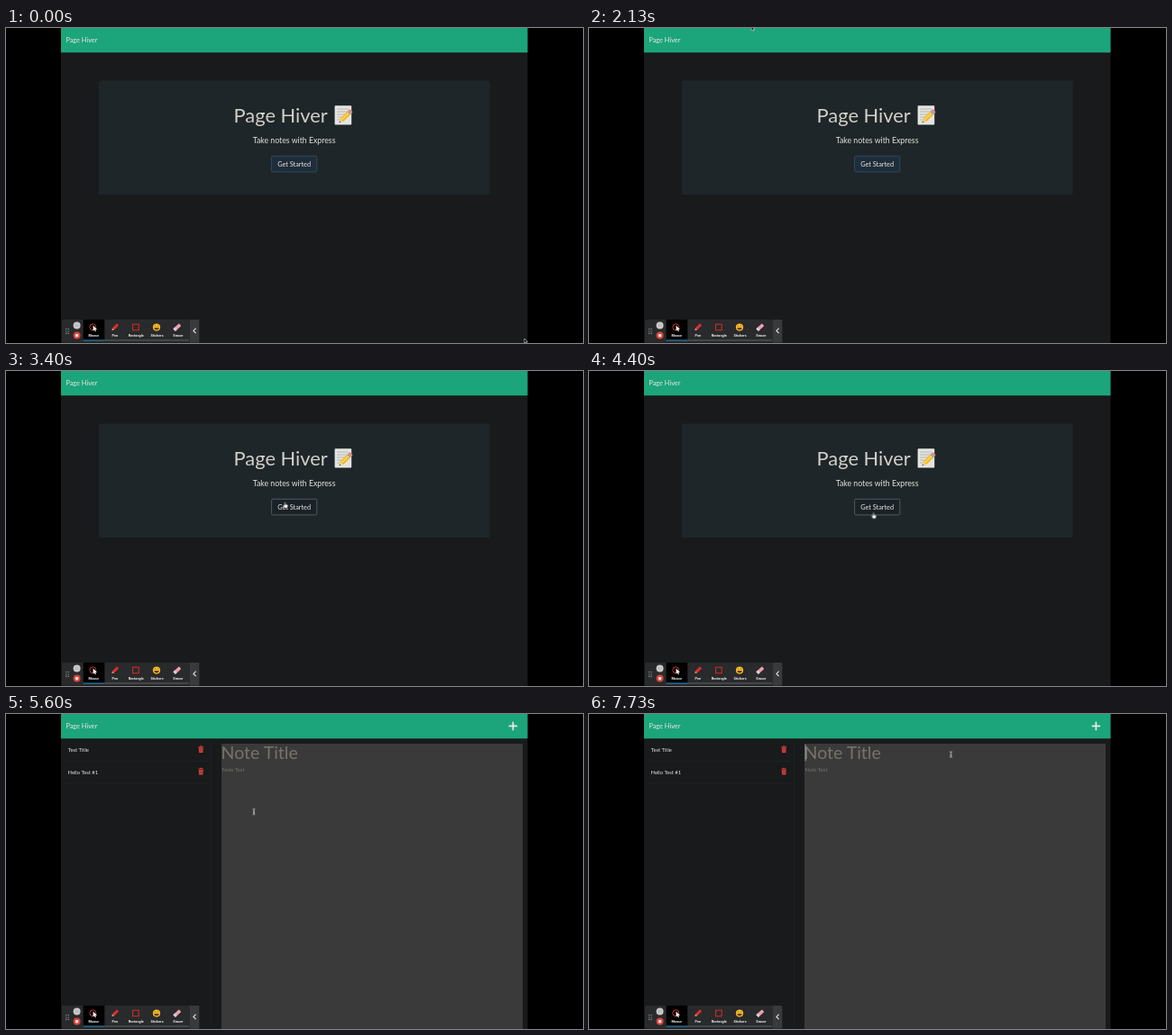
Write an HTML page that moves like this. It is 640 by 350 pixels and loops after 8 s.

```html
<!DOCTYPE html>
<html lang="en">
<head>
<meta charset="utf-8">
<title>Page Hiver</title>
<style>
html, body { margin: 0; width: 100%; height: 100%; overflow: hidden; background: #000; }
svg { display: block; width: 640px; height: 350px; font-family: Lato, sans-serif; }
.loop { animation: 8s step-end infinite; }
.home { animation-name: home; }
.notes { animation-name: notes; }
.loaded { animation-name: loaded; }
.labels { animation-name: labels; }
.paused { animation-name: paused; }
.hover { animation-name: hover; }
.caret { animation-name: caret; }
.arrow { animation-name: arrow; }
.hand { animation-name: hand; }
.beam { animation-name: loaded; }
.pointer { animation: move 8s linear infinite; }

@keyframes home { 0% { visibility: visible } 59.125%, 100% { visibility: hidden } }
@keyframes notes { 0% { visibility: hidden } 59.125%, 100% { visibility: visible } }
@keyframes loaded { 0% { visibility: hidden } 61.625%, 100% { visibility: visible } }
@keyframes labels { 0% { opacity: 1 } 59.125% { opacity: 0 } 61.625%, 100% { opacity: 1 } }
@keyframes paused { 0% { opacity: 0 } 59.125% { opacity: 1 } 61.625%, 100% { opacity: 0 } }
@keyframes hover { 0% { fill: #1f2d3a; stroke: #34516c } 42% { fill: #1a2228; stroke: #5c696d } 100% { fill: #1a2228; stroke: #5c696d } }
@keyframes caret { 0% { opacity: 0 } 85.75% { opacity: 1 } 90.75% { opacity: 0 } 96.625%, 100% { opacity: 1 } }
@keyframes arrow { 0% { visibility: visible } 42%, 100% { visibility: hidden } }
@keyframes hand { 0% { visibility: hidden } 42% { visibility: visible } 61.625%, 100% { visibility: hidden } }
@keyframes move {
  0%, .75% { transform: translate(575px, 345px) }
  3.25%, 5% { transform: translate(428px, 216px) }
  10% { transform: translate(190px, 4px) }
  12.5%, 30.5% { transform: translate(180px, -2.5px) }
  40%, 40.75% { transform: translate(308px, 143px) }
  49%, 51.6% { transform: translate(315px, 156px) }
  52.5%, 61% { transform: translate(315.5px, 157.5px) }
  64.1%, 67.5% { transform: translate(282px, 118px) }
  68.25%, 70.7% { transform: translate(275px, 108.5px) }
  73.25%, 75% { transform: translate(302px, 92px) }
  75.75%, 77.5% { transform: translate(320px, 84px) }
  79.1%, 82.5% { transform: translate(360px, 66px) }
  83.25%, 85% { transform: translate(410px, 49px) }
  85.75%, 100% { transform: translate(401.5px, 45px) }
}
</style>
</head>
<body>
<svg viewBox="0 0 640 350">
  <defs>
    <g id="bin" fill="#d8413c">
      <path d="M-2.9-3.2h1.8l.4-.6h1.4l.4.6h1.8v.9h-5.8z"/>
      <path d="M-2.5-1.9h5l-.3 5.2q0 .5-.6.5h-3.2q-.6 0-.6-.5z"/>
      <path d="M-1.1-1v3.8M0-1v3.8M1.1-1v3.8" stroke="#7d2927" stroke-width=".4"/>
    </g>
    <clipPath id="screen"><path d="M61 0h518v350H61z"/></clipPath>
  </defs>

  <path fill="#181a1b" d="M61 0h517.5v350H61z"/>
  <path fill="#1ca57a" d="M61 0h517.5v27.3H61z"/>
  <text x="66.4" y="16.4" font-size="7.35" fill="#e8e6e3">Page Hiver</text>

  <g class="loop home">
    <rect x="103" y="58.5" width="433.7" height="126.7" rx="2" fill="#1e2629"/>
    <text x="252.6" y="104.8" font-size="21.85" fill="#d3cfc9">Page Hiver</text>
    <g>
      <rect x="364.6" y="86.2" width="18.6" height="21.4" rx=".8" fill="#e4e4e1"/>
      <path d="M367 90h13M367 93h12M367 96h9M367 99h7M367 102h4" stroke="#a9aaa8" stroke-width=".8"/>
      <g transform="translate(369.6 105.2) rotate(-45)">
        <path fill="#eccb9c" d="M0 0 4-2.4v4.8z"/>
        <path fill="#333" d="M0 0 1.5-.9v1.8z"/>
        <path fill="#f3b321" d="M4-2.4h10.8v4.8H4z"/>
        <path fill="#ffd856" d="M4-1.2h10.8v1.8H4z"/>
        <path fill="#9aa3a8" d="M14.8-2.4h1.7v4.8h-1.7z"/>
        <path fill="#e2837f" d="M16.5-2.4h1.4q1.2 0 1.2 1.2v2.4q0 1.2-1.2 1.2h-1.4z"/>
      </g>
    </g>
    <text x="319.6" y="127.6" font-size="8.75" text-anchor="middle" fill="#e3e0dc">Take notes with Express</text>
    <rect class="loop hover" x="294.6" y="142.3" width="50.2" height="17.6" rx="1.4" stroke-width=".8"/>
    <text x="319.6" y="153.7" font-size="7.3" text-anchor="middle" fill="#e8e6e3">Get Started</text>
  </g>

  <g class="loop notes">
    <path d="M227.3 27.3V350" stroke="#222527" stroke-width=".7"/>
    <path fill="#3a3a3a" d="M239 33h334v317H239z"/>
    <g fill="#77736c">
      <text x="238.6" y="49.7" font-size="19.5">Note Title</text>
      <text x="239.6" y="64.4" font-size="5.86">Note Text</text>
    </g>
    <path class="loop caret" d="M240 34v18.4" stroke="#c9c6c1" stroke-width=".7"/>
  </g>

  <g class="loop loaded">
    <g font-size="5.86" fill="#e8e6e3">
      <text x="68.7" y="41.9">Test Title</text>
      <text x="68.5" y="66.5">Hello Test #1</text>
    </g>
    <path d="M64 52.3h160M64 76.8h160" stroke="#232729" stroke-width=".7"/>
    <use href="#bin" x="216.2" y="39.1"/>
    <use href="#bin" x="216.2" y="63.6"/>
    <path d="M558.4 13.4h8M562.4 9.4v8" stroke="#eceae7" stroke-width="1.7" stroke-linecap="round"/>
  </g>

  <g>
    <rect x="62" y="324" width="152.3" height="25.6" rx="1" fill="#292a2b"/>
    <path fill="#383a3b" d="M204 324h9.3q1 0 1 1v23.6q0 1-1 1H204z"/>
    <path fill="#000" d="M85.7 324h23.6v23H85.7z"/>
    <path d="M109.3 347H203" stroke="#5c6263" stroke-width="1"/>
    <path d="M85.7 347h23.6" stroke="#237fae" stroke-width="1.2"/>
    <path d="M66.8 334v6M69.2 334v6" stroke="#a5a5a5" stroke-width="1.1" stroke-dasharray="1.1 1.3"/>
    <circle cx="78.6" cy="330.4" r="4" fill="#c9c9c9"/>
    <path d="M77.5 328.8v3.2M79.7 328.8v3.2" stroke="#b2b2b2" stroke-width=".9"/>
    <g class="loop paused">
      <circle cx="78.6" cy="330.4" r="4" fill="#f4f4f4"/>
      <path d="M77.5 328.6v3.6M79.7 328.6v3.6" stroke="#333" stroke-width="1"/>
    </g>
    <circle cx="78.6" cy="341.6" r="4" fill="#d8443d"/>
    <rect x="77" y="340" width="3.2" height="3.2" rx=".4" fill="#f6dedc"/>
    <path d="M210.6 333.6 207.9 336.4l2.7 2.8" fill="none" stroke="#e6e6e6" stroke-width="1.1"/>

    <circle cx="96.3" cy="332.3" r="3.5" fill="none" stroke="#c8342f" stroke-width="1"/>
    <path d="M96.6 330.4v6.1l1.4-1.2.9 2 1.1-.5-.9-1.9h1.9z" fill="#fff"/>
    <g transform="translate(120.8 332.6) rotate(-45)">
      <path fill="#e0322e" d="M-2.6-1.5h6.4q.8 0 .8.7v1.6q0 .7-.8.7h-6.4z"/>
      <path fill="#f0a09a" d="M-2.6-1.5v3L-4.8 0z"/>
      <path d="M1.9-1.5v3" stroke="#8d1d1b" stroke-width=".5"/>
    </g>
    <rect x="140.6" y="329.2" width="6.6" height="6.6" fill="none" stroke="#d92c29" stroke-width="1"/>
    <circle cx="167" cy="332.6" r="4.1" fill="#f7bd2c"/>
    <path fill="#6a3a12" d="M164.3 332.9h5.4q-.3 2.7-2.7 2.7t-2.7-2.7z"/>
    <path d="M164.7 331.4q.8-1 1.6 0M167.7 331.4q.8-1 1.6 0" fill="none" stroke="#5a3413" stroke-width=".6"/>
    <g transform="translate(189.8 332.6) rotate(-42)">
      <rect x="-4.4" y="-1.8" width="8.8" height="3.6" rx=".7" fill="#ee9db0"/>
      <path fill="#d8d3d6" d="M-4.4-1.1q0-.7.7-.7h1.8v3.6h-1.8q-.7 0-.7-.7z"/>
    </g>
    <g class="loop labels" font-family="Roboto, sans-serif" font-weight="700" font-size="3.8" text-anchor="middle" fill="#f2f2f2">
      <text x="97.3" y="342.8">Mouse</text>
      <text x="120.8" y="342.8">Pen</text>
      <text x="144.2" y="342.8">Rectangle</text>
      <text x="167.6" y="342.8">Stickers</text>
      <text x="191" y="342.8">Eraser</text>
    </g>
  </g>

  <g clip-path="url(#screen)">
    <g class="pointer">
      <path class="loop arrow" d="M0 0v5l1.1-1 .8 1.8 1-.4-.8-1.7h1.5z" fill="#000" stroke="#fff" stroke-width=".5"/>
      <path class="loop hand" d="M-.6.5q0-.7.6-.7t.6.7v1.8l2 .5q.6.2.5.9l-.4 2q-.2.8-.9.8H.1q-.5 0-.9-.6L-2.3 3.7q-.3-.6.2-.8.5-.1 1.5.7z" fill="#fff" stroke="#111" stroke-width=".4"/>
      <path class="loop beam" d="M-1.3-3q1 0 1.3.5.3-.5 1.3-.5M0-2.5v5M-1.3 3q1 0 1.3-.5.3.5 1.3.5M-.7.9H.7" fill="none" stroke="#e9e9e9" stroke-width=".8"/>
    </g>
  </g>
</svg>
</body>
</html>
```
